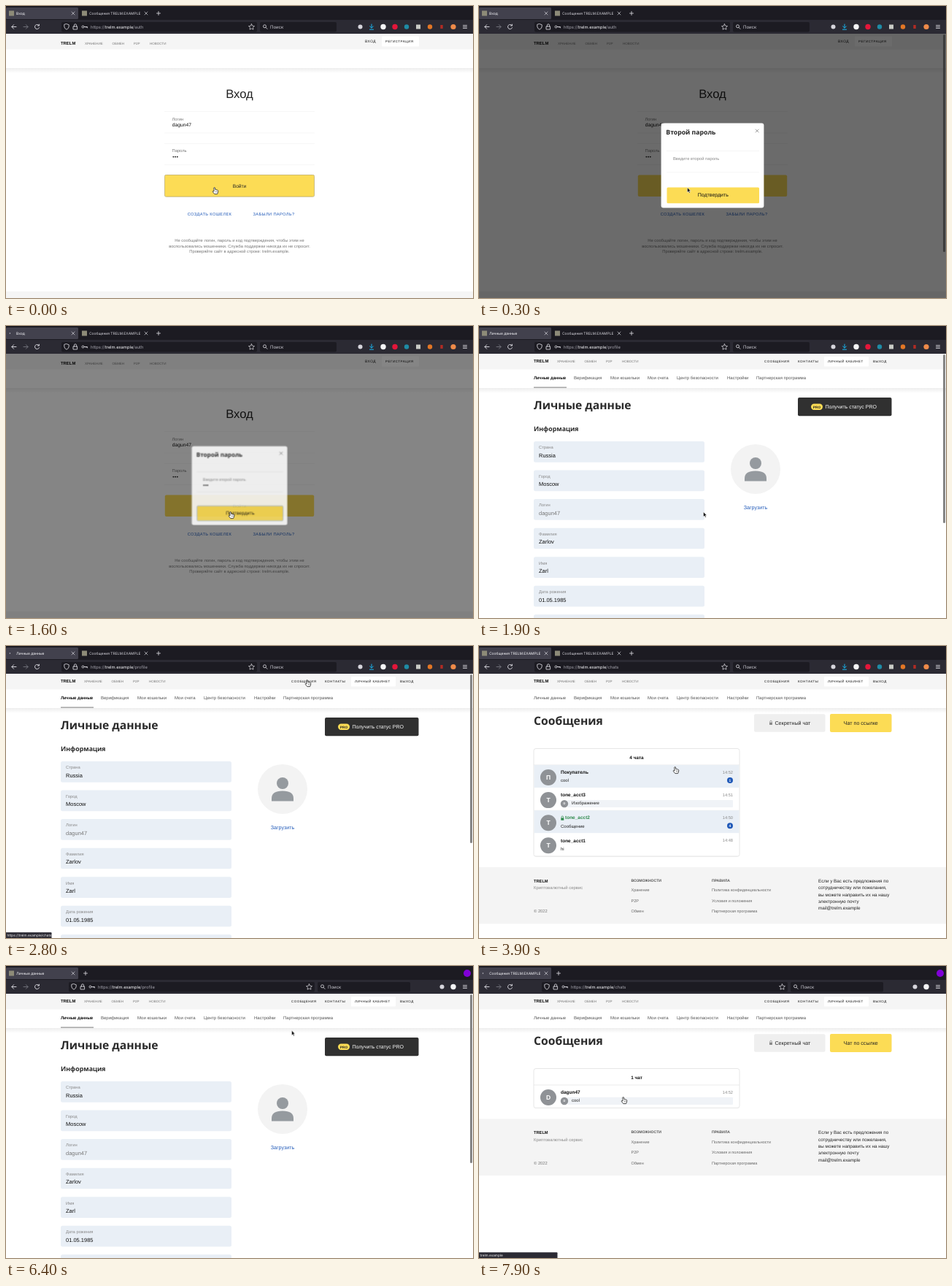
Write an HTML page that moves like this. It is 640 px wide and 400 px high and loops after 8 s.

```html
<!DOCTYPE html>
<html lang="ru">
<head>
<meta charset="utf-8">
<title>Вход</title>
<style>
html, body { margin: 0; width: 100%; height: 100%; overflow: hidden; background: #fff; }
svg { display: block; width: 100vw; height: 100vh; }
text { font-family: "Liberation Sans", Arial, sans-serif; text-rendering: geometricPrecision; white-space: pre; }
.ui text { font-family: Inter, "Liberation Sans", sans-serif; }
.head { font-family: "Noto Sans", "Open Sans", sans-serif; font-weight: 700; }
.caps { letter-spacing: .5px; }
[class^="k-"] { animation: 8s step-end infinite; }

.k-first { animation-name: first; }
.k-second { animation-name: second; }
.k-login { animation-name: login; }
.k-profile { animation-name: profile; }
.k-chats { animation-name: chats; }
.k-load { animation-name: load; }
.k-link { animation-name: link; }
.k-host { animation-name: host; }
.k-bar { animation-name: bar; }
.k-hover { animation-name: hover; }
.k-shade { animation-name: shade; }
.k-modal { animation-name: modal; transform-origin: 320px 219px; transform: scale(var(--zoom, 1)); }
.k-focus { animation-name: focus; }
.k-pin { animation-name: pin; }
.k-name { animation-name: name; }
.k-pass { animation-name: pass; }
.k-move { animation-name: move; animation-timing-function: steps(3); }
.k-arrow { animation-name: arrow; }
.k-hand { animation-name: hand; }

@keyframes first { 0% { opacity: 1 } 53.75% { opacity: 0 } }
@keyframes second { 0% { opacity: 0 } 53.75% { opacity: 1 } }
@keyframes login { 0%, 53.75% { opacity: 1 } 23.75%, 75% { opacity: 0 } }
@keyframes profile { 0%, 42.5%, 86.25% { opacity: 0 } 23.75%, 75% { opacity: 1 } }
@keyframes chats { 0%, 53.75% { opacity: 0 } 42.5%, 86.25% { opacity: 1 } }
@keyframes load { 0%, 23.75%, 42.5%, 75%, 86.25% { opacity: 0 } 18.75%, 33.75%, 70%, 83.75%, 98.75% { opacity: 1 } }
@keyframes link { 0%, 42.5%, 86.25% { opacity: 0 } 31.25%, 81.25% { opacity: 1 } }
@keyframes host { 0% { opacity: 0 } 98.75% { opacity: 1 } }
@keyframes bar { 0%, 11.25%, 67.5% { opacity: 0 } 2.5%, 65% { opacity: 1 } }
@keyframes hover { 0%, 61.25% { opacity: 1 } 2.5%, 65% { opacity: 0 } }
@keyframes shade {
  0%, 22.5%, 73.75% { opacity: 0 }
  2.5%, 65% { opacity: .33 }
  3.75%, 66.25% { opacity: .58 }
  20%, 71.25% { opacity: .48 }
  21.25%, 72.5% { opacity: .2 }
}
@keyframes modal {
  0%, 22.5%, 73.75% { opacity: 0; --zoom: .85 }
  2.5%, 65% { opacity: .5; --zoom: .92 }
  3.75%, 66.25% { opacity: 1; --zoom: 1 }
  20%, 71.25% { opacity: .86; --zoom: .93 }
  21.25%, 72.5% { opacity: .4; --zoom: .87 }
}
@keyframes focus { 0%, 22.5%, 73.75% { opacity: 0 } 16.25%, 70% { opacity: 1 } }
@keyframes pin {
  0%, 8.75%, 26%, 66.25% { transform: none; animation-timing-function: steps(3) }
  12.5%, 25%, 70%, 100% { transform: translateX(9px) }
}
@keyframes name {
  0%, 55% { transform: none; animation-timing-function: steps(3) }
  58.75%, 100% { transform: translateX(28px) }
}
@keyframes pass {
  0%, 58.75% { transform: none; animation-timing-function: steps(2) }
  61.25%, 100% { transform: translateX(9px) }
}
@keyframes move {
  0%, 5% { transform: translate(287px, 253px) }
  8.75%, 12.5% { transform: translate(300px, 214px) }
  16.25% { transform: translate(309px, 259px) }
  23.75% { transform: translate(309px, 259px); animation-timing-function: steps(6) }
  31.25% { transform: translate(414px, 51px) }
  42.5% { transform: translate(414px, 51px); animation-timing-function: steps(2) }
  45% { transform: translate(278px, 203px) }
  48.75% { transform: translate(270px, 170px) }
  53.74% { transform: translate(270px, 170px); animation-timing-function: step-start }
  53.75%, 57.5% { transform: translate(300px, 165px) }
  58.75% { transform: translate(300px, 207px); animation-timing-function: steps(2) }
  61.25%, 66.25% { transform: translate(263px, 252px) }
  70% { transform: translate(309px, 259px) }
  75% { transform: translate(309px, 259px); animation-timing-function: steps(5) }
  81.25% { transform: translate(414px, 51px) }
  86.25% { transform: translate(414px, 51px); animation-timing-function: steps(6) }
  93.75%, 100% { transform: translate(199px, 184px) }
}
@keyframes arrow {
  0%, 16.25%, 31.25%, 47.5%, 61.25%, 70%, 81.25%, 92.5% { opacity: 0 }
  2.5%, 23.75%, 42.5%, 53.75%, 65%, 75%, 86.25% { opacity: 1 }
}
@keyframes hand {
  0%, 16.25%, 31.25%, 47.5%, 61.25%, 70%, 81.25%, 92.5% { opacity: 1 }
  2.5%, 23.75%, 42.5%, 53.75%, 65%, 75%, 86.25% { opacity: 0 }
}
</style>
</head>
<body>
<svg id="stage" viewBox="0 0 640 400" preserveAspectRatio="none"></svg>
<script>
const BRAND = 'TRELM', HOST = 'trelm.example';
const USERS = ['dagun47', 'dagun81'];
const YELLOW = '#fcdc55', TINT = '#e9eff6', BLUE = '#2059b8';

const text = (x, y, s, size, fill = '#222', more = '') =>
  `<text x="${x}" y="${y}" font-size="${size}" fill="${fill}" ${more}>${s}</text>`;
const mid = (x, y, s, size, fill, more = '') => text(x, y, s, size, fill, 'text-anchor="middle" ' + more);
const end = (x, y, s, size, fill) => text(x, y, s, size, fill, 'text-anchor="end"');
const box = (x, y, w, h, fill, r = 0, more = '') =>
  `<rect x="${x}" y="${y}" width="${w}" height="${h}" rx="${r}" fill="${fill}" ${more}/>`;
const dot = (x, y, r, fill) => `<circle cx="${x}" cy="${y}" r="${r}" fill="${fill}"/>`;
const line = (d, stroke, w = 1) =>
  `<path d="${d}" fill="none" stroke="${stroke}" stroke-width="${w}" stroke-linecap="round" stroke-linejoin="round"/>`;
const group = (cls, ...kids) => `<g class="${cls}">${kids.join('')}</g>`;
const shift = (x, y, ...kids) => `<g transform="translate(${x} ${y})">${kids.join('')}</g>`;
const bold = 'font-weight="700"', caps = 'class="caps"', head = 'class="head"';
const dots = (x, y) => [0, 2.7, 5.4].map(d => dot(x + d, y, .95, '#111')).join('');
const padlock = (x, y, fill) =>
  line(`M${x - 1.3} ${y}v-1.5a1.3 1.3 0 0 1 2.6 0v1.5`, fill, .7) + box(x - 2, y - .2, 4, 3.2, fill, .5);

// Browser window
function tab(x) {
  return box(x + 4, 6.5, 7, 7, '#8d8b78') + line(`M${x + 90} 8l4 4m0-4l-4 4`, '#d5d4da', .7);
}
function titles() {
  const label = s => text(14, 12, s, 4.95, '#fbfbfe');
  return group('k-login', label('Вход')) + group('k-profile', label('Личные данные')) +
    group('k-chats', label(`Сообщения ${BRAND}.EXAMPLE`));
}
function address(x) {
  const url = path => text(x, 30.7, `https://<tspan fill="#fbfbfe">${HOST}</tspan>/${path}`, 5.8, '#a5a4ad');
  return ['auth', 'profile', 'chats'].map((p, i) =>
    group(['k-login', 'k-profile', 'k-chats'][i], url(p))).join('');
}
function fields(x, w, sx, sw) {
  const c = '#e4e3e9';
  return box(x, 22, w, 13.5, '#1c1b22', 2) + box(sx, 22, sw, 13.5, '#1c1b22', 2) +
    line(`M${x + 7} 24.6l3.2 1.1v2.3q0 2.7-3.2 4.2q-3.2-1.5-3.2-4.2v-2.3z`, c, .8) +
    line(`M${x + 17.4} 28v-1.6a1.6 1.6 0 0 1 3.2 0v1.6m-4.2 0h5.2v4h-5.2z`, c, .8) +
    `<circle cx="${x + 29.5}" cy="28.5" r="1.5" fill="none" stroke="${c}" stroke-width=".8"/>` +
    line(`M${x + 31} 28.5h4.5v1.4m-1.6-1.4v1`, c, .8) +
    line(`M${x + w - 7.5} 24.7l1.2 2.5 2.8.4-2 1.9.5 2.7-2.5-1.3-2.5 1.3.5-2.7-2-1.9 2.8-.4z`, c, .7) +
    `<circle cx="${sx + 6.5}" cy="27.8" r="2" fill="none" stroke="${c}" stroke-width=".8"/>` +
    line(`M${sx + 8} 29.4l2 2`, c, .8) + text(sx + 14, 30.9, 'Поиск', 6, '#d2d1d8') + address(x + 40);
}
function chrome() {
  const c = '#e4e3e9';
  return box(0, 0, 640, 19, '#1c1b22') + box(0, 19, 640, 19, '#2b2a33') + box(0, 2, 99, 16, '#42414d', 1.5) +
    tab(0) + titles() + group('k-load', box(3, 5, 10, 10, '#42414d'), dot(5.4, 10, .8, '#c9c8d0')) +
    line('M14 28.5h-6m2.6-2.8l-2.7 2.8 2.7 2.8', c, .9) +
    line('M24 28.5h6m-2.6-2.8l2.7 2.8-2.7 2.8', '#77767f', .9) +
    line('M45 26.5a3.1 3.1 0 1 0 .5 3.2m-.1-4.6v1.9h-1.9', c, .9) +
    line('M626.5 26.5h5m-5 2h5m-5 2h5', c, .8);
}
const plus = x => line(`M${x - 2.5} 10h5m-2.5-2.5v5`, '#e4e3e9', .8);

function firstWindow() {
  return group('k-first', tab(100), text(114, 12, `Сообщения ${BRAND}.EXAMPLE`, 4.95, '#d8d7de'), plus(209),
    fields(76, 268, 348, 105), dot(485.5, 28.5, 3, '#d6d5dc'),
    line('M501 25v5m-2.4-2.2l2.4 2.4 2.4-2.4m-5 4.4h5.2', '#18b4f0', 1),
    dot(517, 28.5, 3.7, '#f4f4f6'), dot(533, 28.5, 3.7, '#e4163a'), dot(549, 28.5, 3.2, '#1e8ba5'),
    box(562, 25.5, 6, 6, '#c9cbc6'), dot(581, 28.5, 3.2, '#e27625'),
    box(595.3, 26, 3.4, 5, '#b32b24'), dot(613, 28.5, 3.6, '#ee8a49'));
}
function secondWindow() {
  return group('k-second', plus(109), fields(86, 337, 427, 127), dot(597.5, 28.5, 3, '#d6d5dc'),
    dot(613, 28.5, 3.7, '#f4f4f6'), dot(632, 10, 5, '#8000d7'));
}

// Site pages
const shadow = box(0, 85, 640, 7, 'url(#fade)');
function nav(y, x) {
  return box(0, 38, 640, 21.5, '#f5f5f5') + shadow + text(75, y, BRAND, 5.9, '#111', bold) +
    [['ХРАНЕНИЕ', 108], ['ОБМЕН', 145.5], ['P2P', 175], ['НОВОСТИ', 197]]
      .map(([s, p]) => text(p + x, y, s, 4.55, '#777')).join('');
}
function memberNav() {
  return nav(50.3, -1) + box(473, 42, 61, 13.5, '#fff', 1) +
    [['СООБЩЕНИЯ', 391], ['КОНТАКТЫ', 437], ['ЛИЧНЫЙ КАБИНЕТ', 478], ['ВЫХОД', 540]]
      .map(([s, x]) => text(x, 50.2, s, 4.5, '#111', caps)).join('') +
    [['Личные данные', 75], ['Верификация', 130], ['Мои кошельки', 180], ['Мои счета', 231],
      ['Центр безопасности', 271], ['Настройки', 340], ['Партнерская программа', 380]]
      .map(([s, x]) => text(x, 73.2, s, 6, '#555')).join('');
}
function loginPage() {
  const rule = y => box(217, y, 206, .8, '#f5f5f5');
  return group('k-login', box(0, 38, 640, 362, '#fff'), nav(53, 0),
    text(492, 50.2, 'ВХОД', 4.9, '#111', caps), box(515, 41.5, 51, 14, '#fff', 1),
    text(520, 50, 'РЕГИСТРАЦИЯ', 4.5, '#111', caps),
    mid(320, 126, 'Вход', 16.6), [144, 173.5, 188, 217].map(rule).join(''),
    text(227.5, 156.7, 'Логин', 5.8, '#777'), text(227.5, 200.2, 'Пароль', 5.8, '#777'), dots(229.4, 206.6),
    group('k-first', text(227.8, 165.4, USERS[0], 6.75, '#111')),
    group('k-second', text(227.8, 165.4, USERS[1], 6.75, '#111'),
      box(227, 158, 30, 10, '#fff', 0, 'class="k-name"'), box(227.8, 203, 9.5, 7, '#fff', 0, 'class="k-pass"')),
    box(217.8, 231.6, 204.4, 29.4, YELLOW, 2),
    box(217.4, 231.4, 205.2, 29.8, 'none', 2, 'class="k-hover" stroke="#b9a85e" stroke-width=".8"'),
    mid(320, 249, 'Войти', 6.6), mid(279, 286.6, 'СОЗДАТЬ КОШЕЛЕК', 5.7, BLUE, 'letter-spacing=".35"'),
    mid(367, 286.6, 'ЗАБЫЛИ ПАРОЛЬ?', 5.7, BLUE, 'letter-spacing=".35"'),
    ['Не сообщайте логин, пароль и код подтверждения, чтобы этим не',
      'воспользовались мошенники. Служба поддержки никогда их не спросит.',
      `Проверяйте сайт в адресной строке: ${HOST}.`]
      .map((s, i) => mid(320, 323 + i * 7.6, s, 5.75, '#777')).join(''),
    box(0, 391, 640, 9, '#f5f5f5'));
}
function profilePage() {
  const rows = [['Страна', 'Russia'], ['Город', 'Moscow'], ['Логин', USERS[0]], ['Фамилия', 'Zarlov'],
    ['Имя', 'Zarl'], ['Дата рожения', '01.05.1985'], ['', '']];
  const row = ([label, value], i) => shift(75, 158 + i * 39.55, box(0, 0, 234, 28.7, TINT, 2.5),
    text(7, 10.4, label, 5.8, '#888'), text(7, 21.8, value, 7.5, i == 2 ? '#777' : '#111'));
  return group('k-profile', box(0, 38, 640, 362, '#fff'), memberNav(), text(75, 73.2, 'Личные данные', 6, '#111'),
    box(75, 83.6, 45, 1, '#777'), text(75, 113.5, 'Личные данные', 15.7, '#2b2b2b', head),
    text(75, 144, 'Информация', 8.8, '#2b2b2b', head), rows.map(row).join(''),
    box(437, 98, 128.5, 25.3, '#303030', 2), box(455, 106.5, 16, 8.5, YELLOW, 4.2),
    mid(463, 112.5, 'PRO', 4.8, '#222', bold), text(474.5, 113.2, 'Получить статус PRO', 7, '#fff'),
    dot(379, 196, 34, '#f3f3f3'), dot(379, 188, 8, '#959a9f'),
    '<path d="M364 212.5v-4q0-10 15-10t15 10v4z" fill="#959a9f"/>', mid(379, 251, 'Загрузить', 7.1, BLUE),
    box(636, 39, 3, 231, '#858585', 1.5));
}
function avatar(x, y, r, letter) {
  return dot(x, y, r, '#8f9296') + mid(x, y + r * .27, letter, r * .78, '#fff', bold);
}
function chat(i, [name, note, time, count, via, locked]) {
  const ink = locked ? '#2f8a4d' : '#111';
  return shift(75, 163 + i * 31.1, count ? box(.5, 0, 281, 31, TINT) : box(.5, 30.7, 281, .6, '#eee'),
    avatar(20, 17, 11, name[0].toUpperCase()), locked ? padlock(39.3, 10.6, ink) : '',
    text(locked ? 43 : 37, 12.3, name, 6.5, ink, bold), end(273, 12.2, time, 5.7, '#888'),
    via ? box(46, 16.8, 227, 10.2, '#f0f3f7', 1) + avatar(42, 22, 5.2, via) : '',
    text(via ? 52 : 37, 23.4, note, 6, '#222'),
    count ? dot(269, 21, 4, BLUE) + mid(269, 22.9, count, 5, '#fff', bold) : '');
}
function card(title, rows) {
  return box(75, 140.5, 282, 23 + rows.length * 31.2, '#fff', 3, 'stroke="#e4e4e4" stroke-width=".9"') +
    mid(216, 154.8, title, 6.4, '#111', bold) + box(75, 162.6, 282, .8, '#e6e6e6') +
    rows.map((r, i) => chat(i, r)).join('');
}
function footer(y) {
  const list = (x, title, items) => text(x, 19.8, title, 5.1, '#555', bold) +
    items.map((s, i) => text(x, 33.3 + i * 14.4, s, 5.5, '#666')).join('');
  return shift(0, y, box(0, 0, 640, 77.5, '#f4f4f4'), text(75, 20.8, BRAND, 5.7, '#111', bold),
    text(75, 30.3, 'Криптовалютный сервис', 5.9, '#888'), text(75, 62.3, '© 2022', 5.8, '#777'),
    list(208.5, 'ВОЗМОЖНОСТИ', ['Хранение', 'P2P', 'Обмен']),
    list(319, 'ПРАВИЛА', ['Политика конфиденциальности', 'Условия и положения', 'Партнерская программа']),
    ['Если у Вас есть предложения по', 'сотрудничеству или пожелания,', 'вы можете направить их на нашу',
      'электронную почту', 'mail@' + HOST].map((s, i) => text(465, 20.8 + i * 9.35, s, 6.3, '#222')).join(''));
}
function chatsPage() {
  const many = [['Покупатель', 'cool', '14:52', 1], ['tone_acct3', 'Изображение', '14:51', 0, 'D'],
    ['tone_acct2', 'Сообщение', '14:50', 4, '', true], ['tone_acct1', 'hi', '14:48']];
  return group('k-chats', box(0, 38, 640, 362, '#fff'), memberNav(),
    text(75, 108, 'Сообщения', 15.7, '#2b2b2b', head),
    box(377, 93.3, 97.5, 24.5, '#efefef', 2), padlock(400, 105, '#8a8a8a'), text(405.5, 108, 'Секретный чат', 7.1),
    box(481, 93, 84.5, 25, YELLOW, 2), mid(523.3, 108, 'Чат по ссылке', 7.1),
    group('k-first', card('4 чата', many), footer(303)),
    group('k-second', card('1 чат', [[USERS[0], 'cool', '14:52', 0, 'D']]), footer(209.5)));
}
function dialog() {
  const rule = y => box(257, y, 127, .8, '#f3f3f3');
  return box(0, 38, 640, 362, '#000', 0, 'class="k-shade"') +
    group('k-bar', box(636, 39, 3, 298, '#3c3c3c', 1.5)) +
    group('k-modal', box(249.6, 160.6, 140.8, 116, '#fff', 3), text(256.3, 175.8, 'Второй пароль', 8.7, '#222', head),
      line('M379.2 169l4 4m0-4l-4 4', '#8e8e8e', .9), rule(198), rule(227.5),
      text(266, 211.3, 'Введите второй пароль', 5.8, '#888'), dots(267.5, 218),
      box(266, 215, 9, 6, '#fff', 0, 'class="k-pin"'), box(257.5, 248.6, 126.5, 21.6, YELLOW, 1.5),
      box(257.3, 248.4, 126.9, 22, 'none', 1.5, 'class="k-focus" stroke="#a9bbd0" stroke-width=".9"'),
      mid(320.8, 261.4, 'Подтвердить', 7, '#111'));
}
function status() {
  const tip = (w, s) => box(-1, 392.3, w + 1, 9, '#2b2a33', 1) + text(1.5, 398, s, 4.7, '#f4f4f6');
  return group('k-link', tip(62.5, `https://${HOST}/chats`)) + group('k-host', tip(107.5, HOST));
}
function pointer() {
  return group('k-move',
    group('k-arrow', '<path d="M-1.5-4.3v6.6l1.6-1.3 1.1 2.3 1.1-.5-1.1-2.3h2z" fill="#111" stroke="#fff" stroke-width=".5"/>'),
    group('k-hand', '<path d="M-2.2-4q.9-.9 1.7 0l.3 2.5 2.7.5q1.4.3 1.3 1.6l-.5 2.3-.7 1.7h-3.8l-2.4-2.9q-.6-1 .3-1.3l1.4.6z" fill="#fff" stroke="#222" stroke-width=".8"/>',
      line('M.6.6v1.6M2 .7v1.5', '#444', .5)));
}

document.getElementById('stage').innerHTML =
  '<defs><linearGradient id="fade" x2="0" y2="1"><stop stop-color="#eee"/><stop offset="1" stop-color="#fff"/></linearGradient></defs>' +
  loginPage() + profilePage() + chatsPage() + dialog() +
  group('ui', chrome(), firstWindow(), secondWindow(), status()) + pointer();
</script>
</body>
</html>
```
